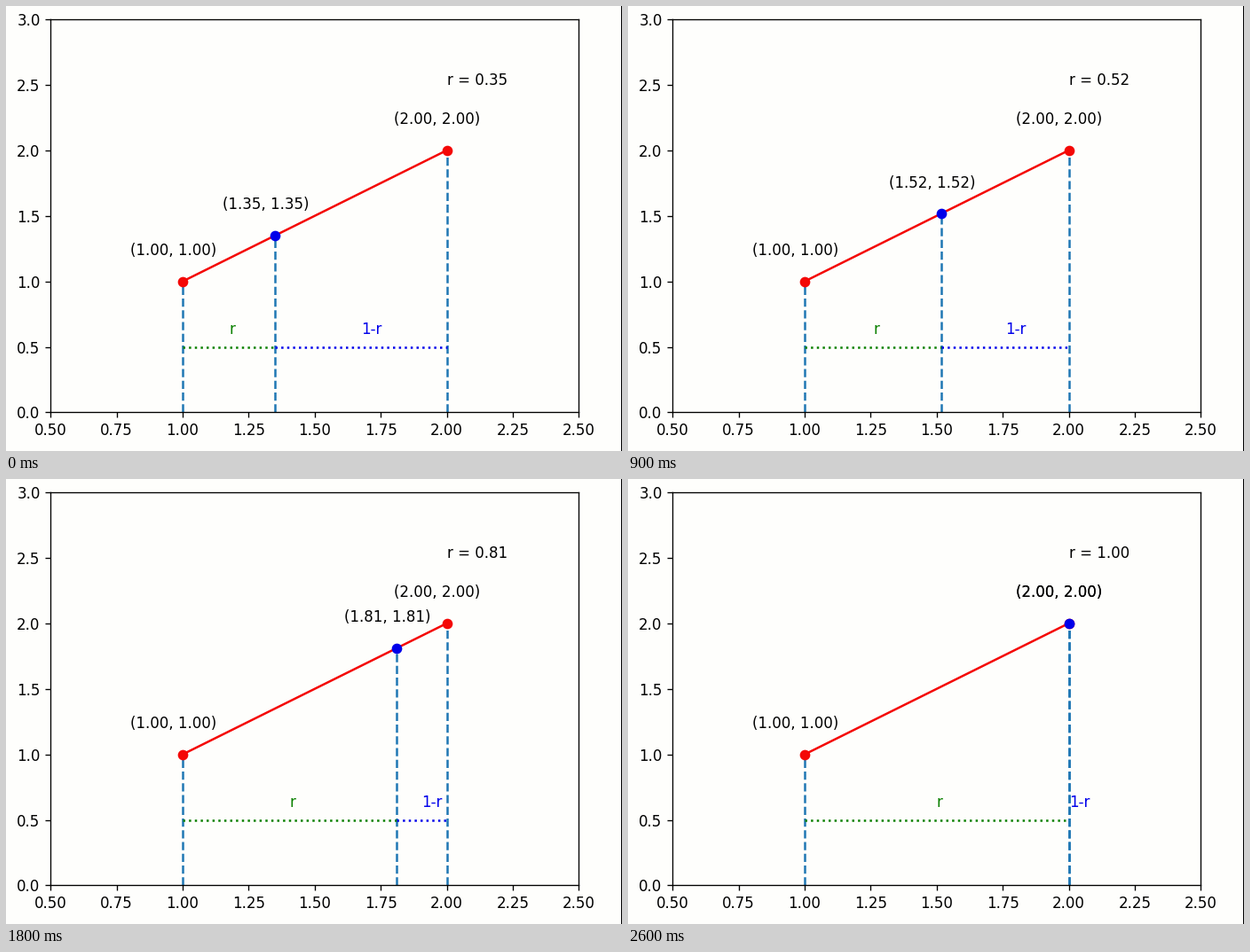
Write a matplotlib script that moves like this. It is 694x502 px and loops after 3.8 s.

```python
import numpy as np
import matplotlib.pyplot as plt
from matplotlib.animation import FuncAnimation
from matplotlib.patches import Rectangle

W, H, DPI = 694, 502, 120
FRAMES, STEP = 38, 100
PAPER, RED, BLUE, GREEN = "#fefefc", "#f40806", "#0000ea", "#0a8000"

# (time in steps, ratio): linear between keys, flat where it pauses
KEYS = [(0, .35), (6, .45), (7, .45), (9, .5176), (10, .5176), (11, .56), (12, .56),
        (13, .60), (15, .67), (16, .67), (18, .81), (19, .81), (20, .878),
        (26, 1.0), (37, 1.0)]
RATIO = np.interp(np.arange(FRAMES), *zip(*KEYS))

A, B = np.array([1.0, 1.0]), np.array([2.0, 2.0])
LEVEL = 0.5

plt.rcParams["font.family"] = "DejaVu Sans"
fig = plt.figure(figsize=(W / DPI, H / DPI), dpi=DPI, facecolor=PAPER)
ax = fig.add_axes([50.25 / W, 43.54 / H, 595.2 / W, 443.52 / H], facecolor=PAPER)
ax.set(xlim=(0.5, 2.5), ylim=(0, 3),
       xticks=np.arange(0.5, 2.51, 0.25), yticks=np.arange(0, 3.1, 0.5))
fig.add_artist(Rectangle((693 / W, 0), 1 / W, 1, color="black", lw=0,
                         transform=fig.transFigure))


def coords(p):
    return f"({p[0]:.2f}, {p[1]:.2f})"


def drop(p):
    return [(p[0], 0), tuple(p)]


def span(x0, x1):
    return [(x0, LEVEL), (x1, LEVEL)]


for p in (A, B):
    ax.vlines(p[0], 0, p[1], colors="C0", linestyles="--")
    ax.text(*(p + [-0.2, 0.2]), coords(p))
ax.plot(*zip(A, B), "o-", color=RED)

post = ax.vlines(1, 0, 1, colors="C0", linestyles="--")
left = ax.hlines(LEVEL, 1, 2, colors=GREEN, linestyles=":")
right = ax.hlines(LEVEL, 1, 2, colors=BLUE, linestyles=":")
dot, = ax.plot([], [], "o", color=BLUE)
dot_label = ax.text(0, 0, "")
left_label = ax.text(0, LEVEL + 0.1, "r", color=GREEN)
right_label = ax.text(0, LEVEL + 0.1, "1-r", color=BLUE)
readout = ax.text(2, 2.5, "")


def update(i):
    r = RATIO[i]
    p = A + r * (B - A)
    post.set_segments([drop(p)])
    left.set_segments([span(A[0], p[0])])
    right.set_segments([span(p[0], B[0])])
    dot.set_data([p[0]], [p[1]])
    dot_label.set_position(p + [-0.2, 0.2])
    dot_label.set_text(coords(p))
    left_label.set_x((A[0] + p[0]) / 2)
    right_label.set_x((p[0] + B[0]) / 2)
    readout.set_text(f"r = {r:.2f}")
    return post, left, right, dot, dot_label, left_label, right_label, readout


anim = FuncAnimation(fig, update, frames=FRAMES, interval=STEP,
                     repeat=True, repeat_delay=0, blit=False)
plt.show()
```
